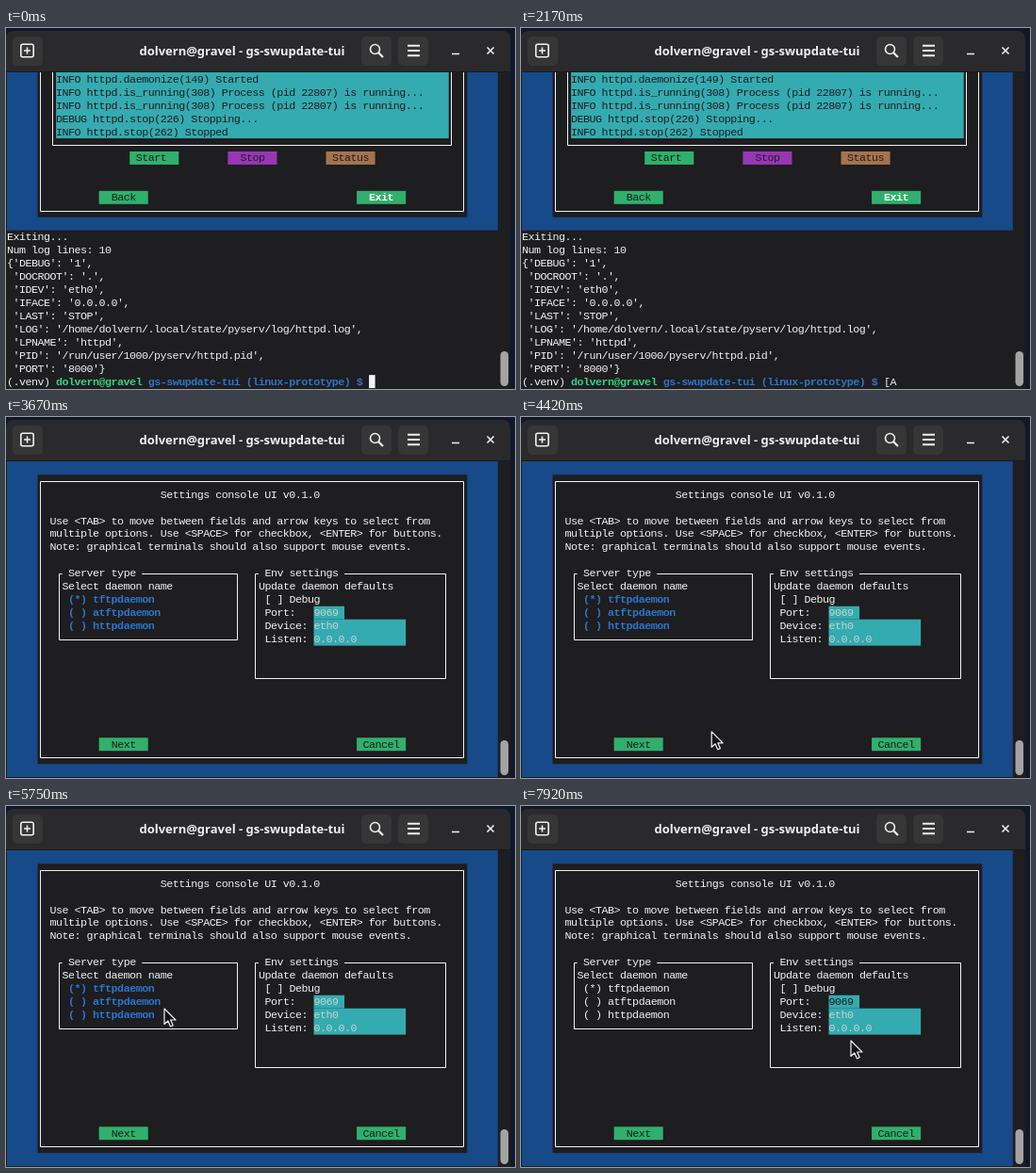
These frames come from a looping animation (540x383 px, 8000 ms). An HTML page:

```html
<!DOCTYPE html>
<html lang="en">
<head>
<meta charset="utf-8">
<title>Settings console</title>
<style>
html, body { margin: 0; width: 100%; height: 100%; overflow: hidden; background: #10192a; }
svg { display: block; width: 540px; height: 383px; }
text { white-space: pre; }
.mono { font: 11.7px "Liberation Mono", monospace; letter-spacing: -0.51px; }
.mono .b { font-weight: 700; }
.title { font: 700 13px "Noto Sans", sans-serif; fill: #efefef; text-anchor: middle; }
.line { fill: none; stroke: #f2f2f0; }
.icon { fill: none; stroke: #f0f0f0; stroke-width: 1.6; }
</style>
</head>
<body>
<svg id="stage" viewBox="0 0 540 383"></svg>
<script>
const LOOP = 8000, STEP = 1000 / 12;
const CW = 6.51, RH = 13.95, TOP = 47.3;
const C = {
  bg: '#1e1d20', blue: '#164a88', teal: '#34abb0', green: '#30b06c', purple: '#9637b4',
  brown: '#a5734d', user: '#33d67c', path: '#2a76cc', ink: '#1e1d20', white: '#f2f2f0', pale: '#c6d3cf'
};

const X = col => 1 + col * CW;
const Y = row => TOP + row * RH;
const midX = col => Math.floor(X(col + 0.5)) + 0.5;
const midY = row => Math.round(Y(row + 0.5)) + 0.5;
const esc = s => s.replace(/</g, '&lt;').replace(/>/g, '&gt;');

function text(col, row, s, fill = C.white, extra = '') {
  return `<text x="${X(col)}" y="${Y(row) + 10.4}" fill="${fill}" ${extra}>${esc(s)}</text>`;
}
const bold = (col, row, s, fill) => text(col, row, s, fill, 'class="b"');
function cells(col, row, cols, rows, fill, extra = '') {
  return `<rect x="${X(col)}" y="${Y(row)}" width="${cols * CW}" height="${rows * RH}" fill="${fill}" ${extra}/>`;
}
function button(col, row, label, at, fill) {
  return cells(col, row, 8, 1, fill) + text(at, row, label, C.ink);
}
// Line box through cell centres, with an optional title set into its top edge
function frame(c0, r0, c1, r1, title) {
  const [l, t, r, b] = [midX(c0), midY(r0), midX(c1), midY(r1)];
  if (!title) return `<path class="line" d="M${l} ${t}H${r}V${b}H${l}Z"/>`;
  const end = X(c0 + 3 + title.length);
  return `<path class="line" d="M${X(c0 + 1)} ${t}H${l}V${b}H${r}V${t}H${end}"/>` + text(c0 + 2, r0, title);
}

function titleBar() {
  const pad = x => `<rect x="${x}" y="9" width="32" height="31" rx="5" fill="#363637"/>`;
  return `<path d="M0 46V10Q1 3 9 3H526Q535 3 535 12V46Z" fill="#2a2a2c"/>
    <path d="M0 46.5H535" stroke="#19191a"/>
    ${pad(7)}${pad(377)}${pad(416)}
    <text class="title" x="250.5" y="28.5">dolvern@gravel - gs-swupdate-tui</text>
    <g class="icon">
      <rect x="15.8" y="17.3" width="13.4" height="13.4" rx="2"/>
      <path d="M22.5 20.5V27.5M19 24H26"/>
      <circle cx="391.5" cy="22.5" r="5"/><path d="M395 26L400 31" stroke-width="2.2"/>
      <path d="M426 18.8H439M426 24H439M426 29.2H439" stroke-width="2"/>
      <path d="M473 27.5H481M510.5 20.5L517.5 27.5M517.5 20.5L510.5 27.5"/>
    </g>`;
}

function shell() {
  const log = ['INFO httpd.daemonize(149) Started',
    'INFO httpd.is_running(308) Process (pid 22807) is running...',
    'INFO httpd.is_running(308) Process (pid 22807) is running...',
    'DEBUG httpd.stop(226) Stopping...', 'INFO httpd.stop(262) Stopped'];
  const out = ['Exiting...', 'Num log lines: 10', "{'DEBUG': '1',", " 'DOCROOT': '.',", " 'IDEV': 'eth0',",
    " 'IFACE': '0.0.0.0',", " 'LAST': 'STOP',", " 'LOG': '/home/dolvern/.local/state/pyserv/log/httpd.log',",
    " 'LPNAME': 'httpd',", " 'PID': '/run/user/1000/pyserv/httpd.pid',", " 'PORT': '8000'}"];
  return cells(0, -1, 80, 13, C.blue) + cells(5, -1, 70, 12, C.bg) +
    frame(5, -2, 74, 10) + frame(7, -2, 72, 5) + cells(8, -1, 64, 6, C.teal) +
    log.map((s, i) => text(8, i, s, C.ink)).join('') +
    button(20, 6, 'Start', 21, C.green) + button(36, 6, 'Stop', 38, C.purple) +
    button(52, 6, 'Status', 53, C.brown) + button(15, 9, 'Back', 17, C.green) +
    cells(57, 9, 8, 1, C.green) + bold(59, 9, 'Exit', '#fff') +
    out.map((s, i) => text(0, 12 + i, s)).join('') +
    text(0, 23, '(.venv)') + bold(8, 23, 'dolvern@gravel', C.user) +
    bold(23, 23, 'gs-swupdate-tui (linux-prototype) $', C.path) +
    text(59, 23, '', C.white, 'id="echo"') +
    `<g id="command">${text(59, 23, 'python scripts/daemon')}${text(0, 24, 'tui.py')}</g>` +
    cells(0, 0, 1, 1, '#f4f4f4', 'id="caret"');
}

function dialog() {
  const help = ['Use <TAB> to move between fields and arrow keys to select from',
    'multiple options. Use <SPACE> for checkbox, <ENTER> for buttons.',
    'Note: graphical terminals should also support mouse events.'];
  const daemons = ['(*) tftpdaemon', '( ) atftpdaemon', '( ) httpdaemon'];
  return cells(0, -1, 80, 25, C.blue) + cells(5, 1, 70, 22, C.bg) + frame(5, 1, 74, 22) +
    text(25, 2, 'Settings console UI v0.1.0') +
    help.map((s, i) => text(7, 4 + i, s)).join('') +
    frame(8, 8, 37, 13, 'Server type') + text(9, 9, 'Select daemon name') +
    `<g id="listOn">${daemons.map((s, i) => bold(10, 10 + i, s, C.path)).join('')}</g>` +
    `<g id="listOff">${daemons.map((s, i) => text(10, 10 + i, s)).join('')}</g>` +
    frame(40, 8, 71, 16, 'Env settings') + text(41, 9, 'Update daemon defaults') +
    ['[ ] Debug', 'Port:', 'Device:', 'Listen:'].map((s, i) => text(42, 10 + i, s)).join('') +
    cells(50, 11, 5, 1, C.teal) + cells(50, 12, 15, 2, C.teal) +
    text(50, 11, '9069', C.pale, 'id="port"') + text(50, 12, 'eth0', C.pale) + text(50, 13, '0.0.0.0', C.pale) +
    button(15, 21, 'Next', 17, C.green) + button(57, 21, 'Cancel', 58, C.green);
}

document.getElementById('stage').innerHTML = `
  <clipPath id="view"><rect y="47" width="522" height="335.5"/></clipPath>
  <rect width="540" height="383" fill="#10192a"/>
  <rect y="46" width="535" height="337" fill="${C.bg}"/>
  ${titleBar()}
  <g class="mono" clip-path="url(#view)"><g id="shell">${shell()}</g><g id="dialog">${dialog()}</g></g>
  <rect x="524.5" y="343" width="8.5" height="37" rx="4.2" fill="#a3a3a2"/>
  <path id="pointer" d="M0 0V16.5L3.9 13L6.5 19L9.2 17.8L6.6 12H12Z" fill="#111" stroke="#f2f2f2" stroke-width="1.2" stroke-linejoin="round"/>`;

const $ = id => document.getElementById(id);
const show = (id, on) => $(id).setAttribute('display', on ? 'inline' : 'none');

// Pointer stops: time, x, y
const path = [[4250, 230, 372], [4670, 150, 262], [4830, 150, 262], [5080, 88, 192], [5330, 88, 192],
  [5580, 104, 204], [5920, 232, 226], [6170, 232, 226], [6480, 350, 208], [7080, 350, 208], [7580, 350, 249]];

function pointerAt(t) {
  const i = path.findIndex(p => p[0] > t);
  if (i < 0) return path[path.length - 1].slice(1);
  const [a, b] = [path[Math.max(0, i - 1)], path[i]];
  const k = (t - a[0]) / (b[0] - a[0]);
  const e = k * k * (3 - 2 * k);
  return [a[1] + (b[1] - a[1]) * e, a[2] + (b[2] - a[2]) * e];
}

// Stray key code: typed, then rubbed out
function echoAt(t) {
  if (t < 1580 || t >= 2670) return '';
  return t >= 1670 && t < 2580 ? '[A' : '[';
}

function draw(t) {
  const typed = t >= 3170, ran = t >= 3500, open = t >= 3580;
  const portFocus = t >= 6830;
  const echo = typed ? '' : echoAt(t);
  const scroll = ran ? 2 : typed ? 1 : 0;
  const [col, row] = ran ? [0, 25] : typed ? [7, 24] : [59 + echo.length, 23];
  const lit = t < 1080 || (t >= 1580 && t < 2170) || t >= 2580;

  $('shell').setAttribute('transform', `translate(0 ${-scroll * RH})`);
  $('caret').setAttribute('x', X(col));
  $('caret').setAttribute('y', Y(row));
  $('echo').textContent = echo;
  show('caret', lit);
  show('command', typed);
  show('shell', !open);
  show('dialog', open);
  show('listOn', !portFocus);
  show('listOff', portFocus);
  $('port').setAttribute('fill', portFocus ? C.ink : C.pale);

  show('pointer', t >= path[0][0]);
  const [x, y] = pointerAt(Math.floor((t + 4) / STEP) * STEP);
  $('pointer').setAttribute('transform', `translate(${x.toFixed(1)} ${y.toFixed(1)})`);
}

const start = performance.now();
function tick() {
  draw((performance.now() - start) % LOOP);
  requestAnimationFrame(tick);
}
tick();
</script>
</body>
</html>
```
